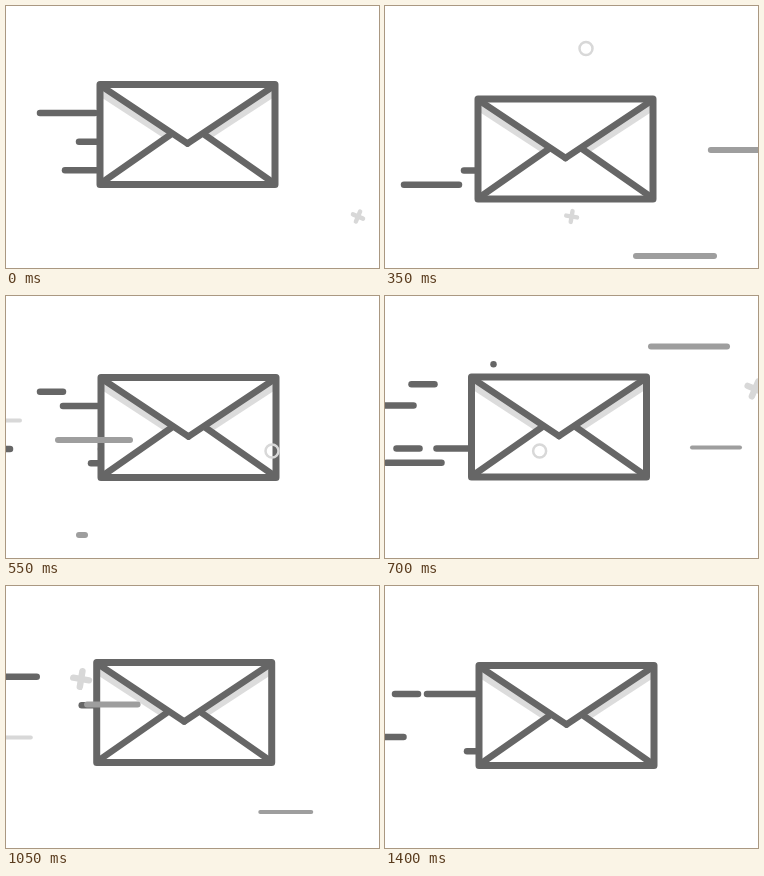
Animation, 373 px wide and 262 px high, one loop 1.45 s. Source, as an HTML page with a canvas:

```html
<!DOCTYPE html>
<html lang="en">
<head>
<meta charset="utf-8">
<title>Flying envelope</title>
<style>
  html, body { margin: 0; width: 100%; height: 100%; overflow: hidden; background: #fff; }
  canvas { display: block; }
</style>
</head>
<body>
<canvas id="stage" width="373" height="262"></canvas>
<script>
const ctx = document.getElementById('stage').getContext('2d');
const LOOP = 1450, STEP = 50;
const DARK = '#666', GRAY = '#9e9e9e', PALE = '#d8d8d8';
const W = 175, H = 100, ROW = H / 7;
const TRAIL_SPEED = 0.5, DRIFT_ACCELERATION = 0.00095;

// Key poses of the envelope: time, left, top
const poses = [
  [0, 94, 78.5], [350, 93, 93], [550, 95, 81.5], [700, 86.5, 81],
  [900, 89, 79], [1100, 91, 76], [1200, 92, 82.5], [1400, 94, 79.5]
];

// Launch times of the dashes shed by the envelope, by row
const shortTrails = { 0.5: [580], 1: [428, 778], 2: [1232], 5: [322, 550, 1203] };
const longTrails = {
  '-0.9': [744], 1: [820], 2: [-120, 474, 1296], 3: [1020, 1070],
  4: [-42], 5: [630], 6: [-70, 202, 530, 1376]
};

// Wind streaks: each passes x at the given time
const thickStreaks = [
  { time: 350, x: 251, y: 250, length: 78 },
  { time: 550, x: 52, y: 144, length: 72 },
  { time: 550, x: 73, y: 239, length: 6 },
  { time: 700, x: 266, y: 50.5, length: 76 },
  { time: 900, x: 270, y: 118.5, length: 73 }
];
const thinStreaks = [
  { time: 550, x: 0, y: 124.5, length: 14 },
  { time: 700, x: 307, y: 151.5, length: 48 },
  { time: 900, x: 147, y: 151.5, length: 88 },
  { time: 900, x: -8, y: 122, length: 16 },
  { time: 1200, x: -4, y: 226, length: 51 }
];

const rings = [
  { time: 350, x: 201, y: 42.5, speed: 0.9 },
  { time: 550, x: 266, y: 155, speed: 0.6 }
];
const sparks = [
  { time: 0, x: 352, y: 210.5, speed: 0.14, size: 5.5 },
  { time: 700, x: 370, y: 93, speed: 0.51, size: 8 }
];

const clamp = (v, low, high) => Math.min(high, Math.max(low, v));

function poseAt(t) {
  const i = Math.max(1, poses.findIndex(p => p[0] >= t));
  const [t0, x0, y0] = poses[i - 1], [t1, x1, y1] = poses[i];
  const e = (1 - Math.cos(Math.PI * (t - t0) / (t1 - t0))) / 2;
  return [x0 + (x1 - x0) * e, y0 + (y1 - y0) * e];
}

function polyline(points, width, color) {
  ctx.beginPath();
  points.forEach(([x, y]) => ctx.lineTo(x, y));
  ctx.lineWidth = width;
  ctx.strokeStyle = color;
  ctx.stroke();
}

// Dashes grow out of the left edge, or from the top when above the envelope
function drawTrails(trails, length, t) {
  for (const [row, launches] of Object.entries(trails)) {
    const origin = row < 0 ? -22 : 0, y = row * ROW;
    for (const launch of launches) {
      const head = (t - launch) * TRAIL_SPEED;
      if (head < origin) continue;
      polyline([[-head, y], [-Math.max(origin, head - length), y]], 6.5, DARK);
    }
  }
}

// Lower streaks move faster and short ones dart; thick ones shrink, thin ones fade
function drawStreak({ time, x, y, length }, t, thin) {
  const age = t - time;
  const speed = 0.75 + y * 0.0043 + (length < 30 ? 0.7 : 0);
  const left = x - age * speed;
  const size = thin ? length : length - age * 0.15;
  if (size < 0) return;
  ctx.globalAlpha = thin ? clamp(left / 130, 0.4, 1) : 1;
  polyline([[left, y], [left + size, y]], thin ? 4 : 6, GRAY);
  ctx.globalAlpha = 1;
}

function driftX({ time, x, speed }, t) {
  const age = t - time;
  return x - speed * age - DRIFT_ACCELERATION * Math.max(0, age) ** 2;
}

function drawRing(ring, t) {
  ctx.beginPath();
  ctx.arc(driftX(ring, t), ring.y, 6.5, 0, Math.PI * 2);
  ctx.lineWidth = 2.5;
  ctx.strokeStyle = PALE;
  ctx.stroke();
}

function drawSpark(spark, t) {
  const { time, y, size } = spark;
  if (t < time) return;
  ctx.save();
  ctx.translate(driftX(spark, t), y);
  ctx.rotate(0.4 - (t - time) / 1500);
  polyline([[-size, 0], [size, 0]], size * 0.8, PALE);
  polyline([[0, -size], [0, size]], size * 0.8, PALE);
  ctx.restore();
}

function drawHalf() {
  ctx.beginPath();
  [[3, 5], [3, 14], [62, 52.5], [70, 49]].forEach(([x, y]) => ctx.lineTo(x, y));
  ctx.fillStyle = '#dcdcdc';
  ctx.fill();
  polyline([[2, H - 2], [70, 50.5]], 6.5, DARK);
  polyline([[2, 2], [W / 2, 59]], 6.5, DARK);
}

function drawEnvelope() {
  ctx.fillStyle = '#fff';
  ctx.fillRect(0, 0, W, H);
  drawHalf();
  ctx.save();
  ctx.translate(W, 0);
  ctx.scale(-1, 1);
  drawHalf();
  ctx.restore();
  ctx.lineWidth = 7;
  ctx.strokeRect(0, 0, W, H);
}

function draw(now) {
  const t = Math.floor((now % LOOP) / STEP) * STEP;
  ctx.fillStyle = '#fff';
  ctx.fillRect(0, 0, 373, 262);
  ctx.lineCap = ctx.lineJoin = 'round';

  ctx.save();
  ctx.translate(...poseAt(t));
  drawTrails(shortTrails, 23, t);
  drawTrails(longTrails, 55, t);
  drawEnvelope();
  ctx.restore();

  thickStreaks.forEach(s => drawStreak(s, t, false));
  thinStreaks.forEach(s => drawStreak(s, t, true));
  rings.forEach(r => drawRing(r, t));
  sparks.forEach(s => drawSpark(s, t));
}

const began = performance.now();
function tick() {
  draw(performance.now() - began);
  requestAnimationFrame(tick);
}
tick();
</script>
</body>
</html>
```
